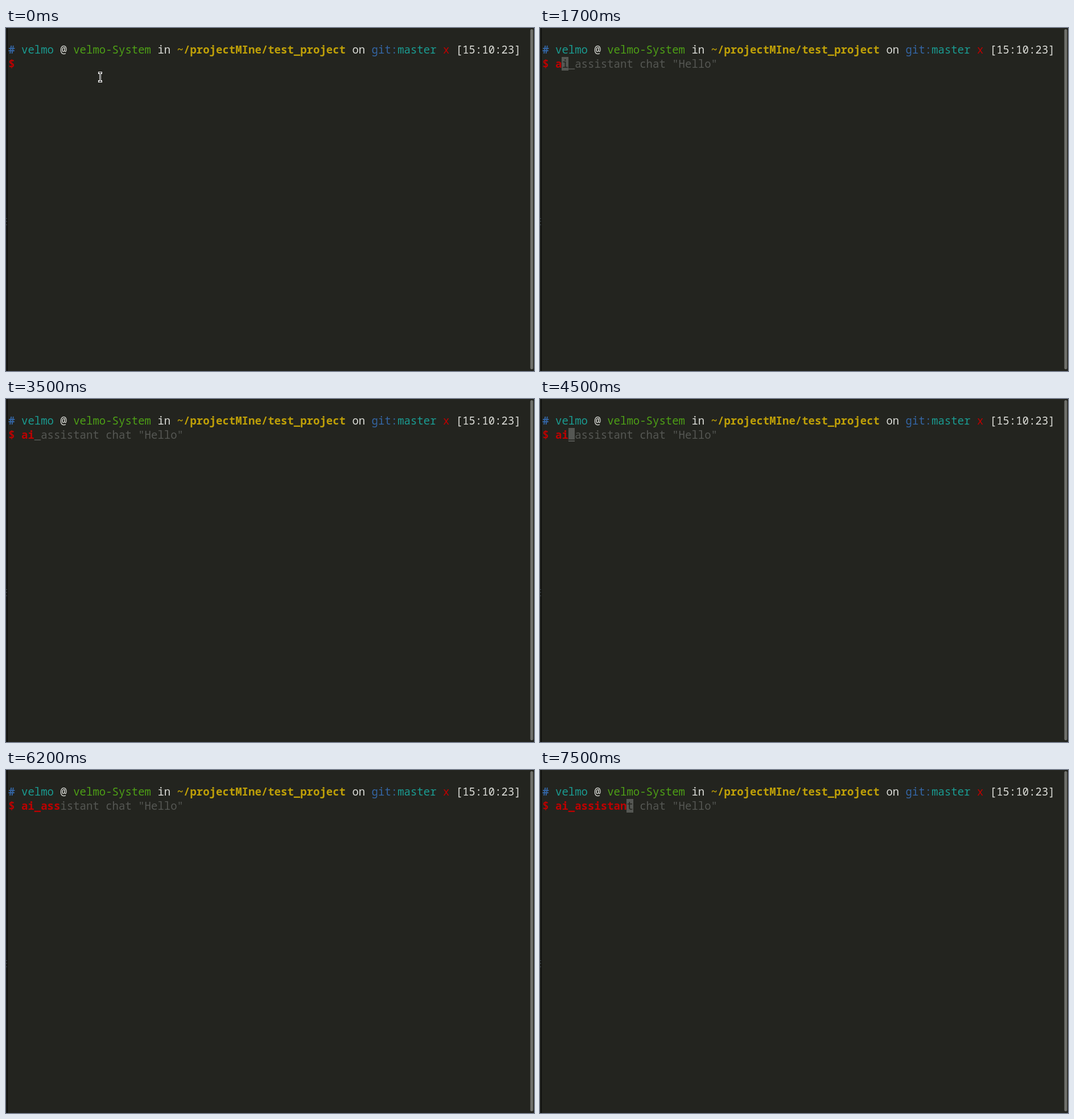
Write an HTML page with a canvas that moves like this. It is 928 px wide and 604 px high and loops after 8 s.

```html
<!DOCTYPE html>
<html lang="en">
<head>
<meta charset="utf-8">
<title>Terminal</title>
<style>
  html, body { margin: 0; width: 100%; height: 100%; overflow: hidden; background: #23241f; }
  canvas { display: block; }
</style>
</head>
<body>
<canvas id="stage" width="928" height="604"></canvas>
<script>
const ctx = document.getElementById('stage').getContext('2d');

const LOOP = 8000;
const FONT = '19px "Noto Sans Mono", monospace';
const LEFT = 4.2, CELL = 11.4;
const BASE = [45, 70];
const COLOR = {
  back: '#23241f', fore: '#dcddd8', blue: '#3465a4', teal: '#1a9c92',
  green: '#4ea016', gold: '#bfa008', red: '#bd0000', ghost: '#555753'
};

const PROMPT = [
  ['# ', 'blue', true], ['velmo ', 'teal'], ['@ ', 'fore'], ['velmo-System ', 'green'],
  ['in ', 'fore'], ['~/projectMIne/test_project ', 'gold', true], ['on ', 'fore'],
  ['git:', 'blue'], ['master ', 'teal'], ['x ', 'red'], ['[15:10:23]', 'fore']
];
const COMMAND = 'ai_assistant chat "Hello"';
const START = 2;

// [time, typed characters, cursor visible]
const STEPS = [
  [0, 0, false], [200, 0, true], [1000, 1, true], [1400, 1, false], [1700, 1, true],
  [2000, 2, true], [2300, 2, false], [2900, 2, true], [3500, 2, false], [4500, 2, true],
  [4900, 3, true], [5300, 4, true], [5700, 6, true], [6200, 6, false], [6500, 7, true],
  [6600, 8, true], [6800, 9, true], [6900, 10, true], [7500, 11, true]
];

const columnX = col => LEFT + col * CELL;

function write(text, col, row, color, bold) {
  ctx.font = (bold ? 'bold ' : '') + FONT;
  ctx.fillStyle = COLOR[color];
  ctx.fillText(text, columnX(col), BASE[row]);
}

function drawFrame() {
  ctx.fillStyle = COLOR.back;
  ctx.fillRect(0, 0, 928, 604);

  // Sliver of the neighbouring window
  ctx.fillStyle = '#1c1d1a';
  ctx.fillRect(0, 0, 2, 604);
  ctx.fillStyle = '#080907';
  ctx.fillRect(2, 0, 1, 604);
  ctx.fillStyle = '#414b52';
  for (const y of [335, 340, 346]) ctx.fillRect(0, y, 2, 1);

  ctx.fillStyle = '#70716d';
  ctx.beginPath();
  ctx.roundRect(921.5, 2, 5, 599, 2.5);
  ctx.fill();
}

function drawPrompt() {
  let col = 0;
  for (const [text, color, bold] of PROMPT) {
    write(text, col, 0, color, bold);
    col += text.length;
  }
  write('$', 0, 1, 'red', true);
}

function drawCommand(typed, cursorOn) {
  const col = START + typed;
  if (typed) {
    write(COMMAND.slice(0, typed), START, 1, 'red', true);
    write(COMMAND.slice(typed), col, 1, 'ghost');
  }
  if (!cursorOn) return;
  const x = Math.round(columnX(col));
  ctx.fillStyle = typed ? COLOR.ghost : COLOR.fore;
  ctx.fillRect(x, 51, Math.round(columnX(col + 1)) - x, 24);
  if (typed) write(COMMAND[typed], col, 1, 'back');
}

function drawPointer() {
  const bar = (x, y, w, h) => ctx.fillRect(x, y, w, h);
  ctx.fillStyle = '#f2f2f2';
  bar(162, 77, 7, 4);
  bar(162, 92, 7, 4);
  bar(164, 79, 3, 15);
  ctx.fillStyle = '#10110e';
  bar(163, 78, 5, 1);
  bar(163, 94, 5, 1);
  bar(165, 78, 1, 17);
}

function render(now) {
  const time = now % LOOP;
  const [, typed, cursorOn] = STEPS.findLast(step => step[0] <= time);
  drawFrame();
  drawPrompt();
  drawCommand(typed, cursorOn);
  if (!typed) drawPointer();
}

const origin = performance.now();
function tick() {
  render(performance.now() - origin);
  requestAnimationFrame(tick);
}
tick();
</script>
</body>
</html>
```
